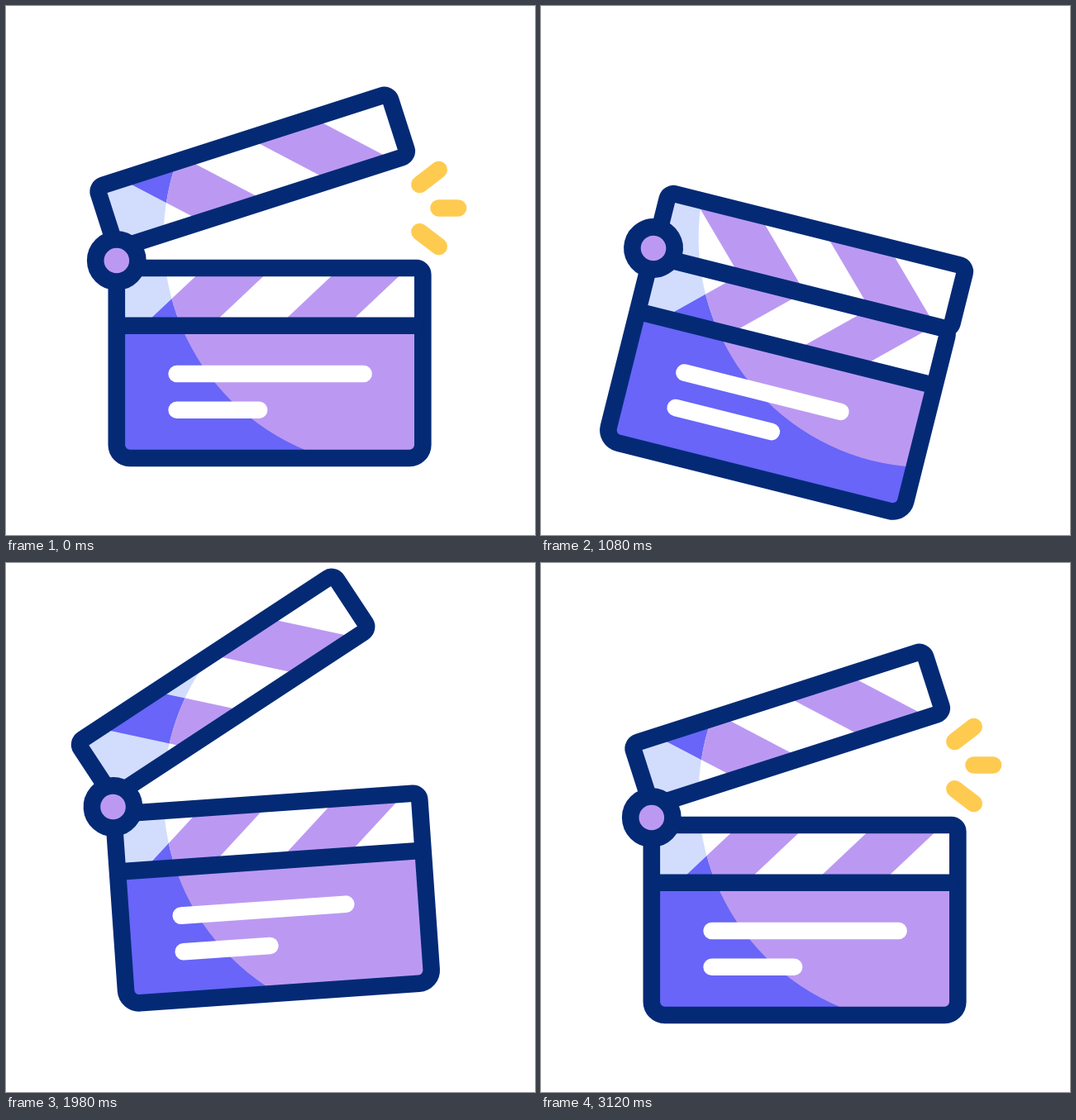
Recreate the animation shown at these times as an HTML page with a canvas. Size 640 by 640 pixels, loop 3600 ms.

```html
<!DOCTYPE html>
<html lang="en">
<head>
<meta charset="utf-8">
<title>Clapperboard</title>
<style>
html, body { margin: 0; width: 100%; height: 100%; overflow: hidden; background: #fff; }
canvas { display: block; }
</style>
</head>
<body>
<canvas id="stage" width="640" height="640"></canvas>
<script>
const ctx = document.getElementById('stage').getContext('2d');
const LOOP = 3600, LINE = 20.6;
const NAVY = '#042a76', PURPLE = '#bb99f2', BLUE = '#6865f8', PALE = '#d2ddfd', YELLOW = '#fecb50';

// time, hinge x, hinge y, board angle, arm angle, arm lift, long bar, short bar
const POSES = [
  [120, 133.8, 308, 0, -17.8, -25.3, 226, 99.5],
  [580, 133.9, 299.8, 11.2, -38.3, -26, 232, 99.5],
  [620, 134, 299.5, 11.4, -38.1, -26, 233, 99.5],
  [1030, 135.8, 293.4, 13.7, 0, 0, 201, 117],
  [1080, 136, 293, 14.04, 0, 0, 195, 119.6],
  [1230, 136, 296.8, 14.8, 0, 0, 178, 124],
  [1720, 129.5, 283.5, -0.4, -17.2, -18.7, 157.5, 123.5],
  [1980, 129.5, 295, -4, -29.3, -25, 200, 105],
  [2240, 134.5, 300, 2.45, -7.36, -25, 227, 99.5],
  [2330, 135.5, 291, 6.5, 0, -3, 226, 99.5],
  [2540, 134, 306.5, 0.98, -14, -24.8, 226, 99.5],
  [2790, 134, 313, -1.6, -21.9, -25.3, 226, 99.5],
  [3120, 133.8, 308, 0, -17.8, -25.3, 226, 99.5]
];

// time, inner end, outer end, both in ray lengths
const SPARKS = [
  [120, 0, 1], [280, 0.7, 1.5], [360, 1.5, 1.5], [2170, 0.2, 0.2],
  [2240, 0.38, 1.1], [2340, 0.7, 1.68], [2540, 0.1, 1.1], [2800, 0, 1]
];

// start point and direction of each ray
const RAYS = [[366.6, -92, 23.3, -18], [389.7, -63.5, 23.5, 0], [366.6, -34.8, 23.3, 17.8]];

// Smooth interpolation that never overshoots its keys
function sample(rows, t) {
  const last = rows.length - 1;
  if (t <= rows[0][0]) return rows[0].slice(1);
  if (t >= rows[last][0]) return rows[last].slice(1);
  const i = rows.findIndex(row => row[0] > t) - 1;
  const span = rows[i + 1][0] - rows[i][0], p = (t - rows[i][0]) / span;
  return rows[i].slice(1).map((from, k) => {
    const c = k + 1, to = rows[i + 1][c];
    const rate = j => (rows[j + 1][c] - rows[j][c]) / (rows[j + 1][0] - rows[j][0]);
    const slope = j => {
      if (j === 0 || j === last) return 0;
      const before = rate(j - 1), after = rate(j);
      return before * after > 0 ? 2 * before * after / (before + after) : 0;
    };
    const q = 1 - p;
    return from * q * q * (1 + 2 * p) + to * p * p * (3 - 2 * p)
      + span * p * q * (q * slope(i) - p * slope(i + 1));
  });
}

function line(x1, y1, x2, y2, color, cap = 'round') {
  ctx.beginPath();
  ctx.moveTo(x1, y1);
  ctx.lineTo(x2, y2);
  ctx.strokeStyle = color;
  ctx.lineCap = cap;
  ctx.stroke();
}

function outline(x, y, w, h, radii) {
  ctx.beginPath();
  ctx.roundRect(x, y, w, h, radii);
  ctx.strokeStyle = NAVY;
  ctx.stroke();
}

// Two slanted bands; x is the left edge of the first at the top
function bands(x, top, bottom, shift, step) {
  for (const left of [x, x + 2 * step]) {
    ctx.beginPath();
    ctx.moveTo(left, top);
    ctx.lineTo(left + step, top);
    ctx.lineTo(left + step + shift, bottom);
    ctx.lineTo(left + shift, bottom);
    ctx.fill();
  }
}

// Dark tones everywhere, light tones inside a circle fixed to the stage
function shade(fill) {
  fill(PALE, BLUE);
  ctx.save();
  const pose = ctx.getTransform();
  ctx.resetTransform();
  ctx.beginPath();
  ctx.arc(468.3, 280.7, 277.7, 0, 7);
  ctx.clip();
  ctx.setTransform(pose);
  fill('#fff', PURPLE);
  ctx.restore();
}

function drawBoard(long, short) {
  shade((base, accent) => {
    ctx.fillStyle = base;
    ctx.fillRect(0, 9, 370.5, 70);
    ctx.fillStyle = accent;
    bands(106.2, 9, 79, -74.3, 82);
    ctx.beginPath();
    ctx.roundRect(0, 79, 370.5, 160, [0, 0, 16, 16]);
    ctx.fill();
  });
  outline(0, 9, 370.5, 230, [8, 8, 16, 16]);
  line(0, 78.8, 370.5, 78.8, NAVY, 'butt');
  line(72.8, 137, 72.8 + long, 137, '#fff');
  line(72.8, 180.8, 72.8 + short, 180.8, '#fff');
}

function drawArm(angle, lift) {
  ctx.save();
  ctx.translate(11 + lift * 0.087, 9 + lift);
  ctx.rotate(angle);
  ctx.translate(-9.3, -79);
  shade((base, accent) => {
    ctx.fillStyle = base;
    ctx.fillRect(0, 0, 371, 78.5);
    ctx.fillStyle = accent;
    bands(31.7, 0, 78.5, 77.3, 81);
  });
  outline(0, 0, 371, 78.5, 8);
  ctx.restore();
}

function drawHinge() {
  ctx.beginPath();
  ctx.arc(0, 0, 25.6, 0, 7);
  ctx.fillStyle = PURPLE;
  ctx.fill();
  ctx.strokeStyle = NAVY;
  ctx.stroke();
}

function drawSparks(inner, outer) {
  if (outer - inner < 0.02) return;
  for (const [x, y, dx, dy] of RAYS)
    line(x + dx * inner, y + dy * inner, x + dx * outer, y + dy * outer, YELLOW);
}

function draw(now) {
  const t = now % LOOP, rad = Math.PI / 180;
  const [x, y, tilt, swing, lift, long, short] = sample(POSES, t);
  ctx.resetTransform();
  ctx.fillStyle = '#fff';
  ctx.fillRect(0, 0, 640, 640);
  ctx.lineWidth = LINE;
  ctx.translate(x, y);
  ctx.rotate(tilt * rad);
  drawBoard(long, short);
  drawArm(swing * rad, lift);
  drawHinge();
  drawSparks(...sample(SPARKS, t));
}

const start = performance.now();
function tick() {
  draw(performance.now() - start);
  requestAnimationFrame(tick);
}
tick();
</script>
</body>
</html>
```
